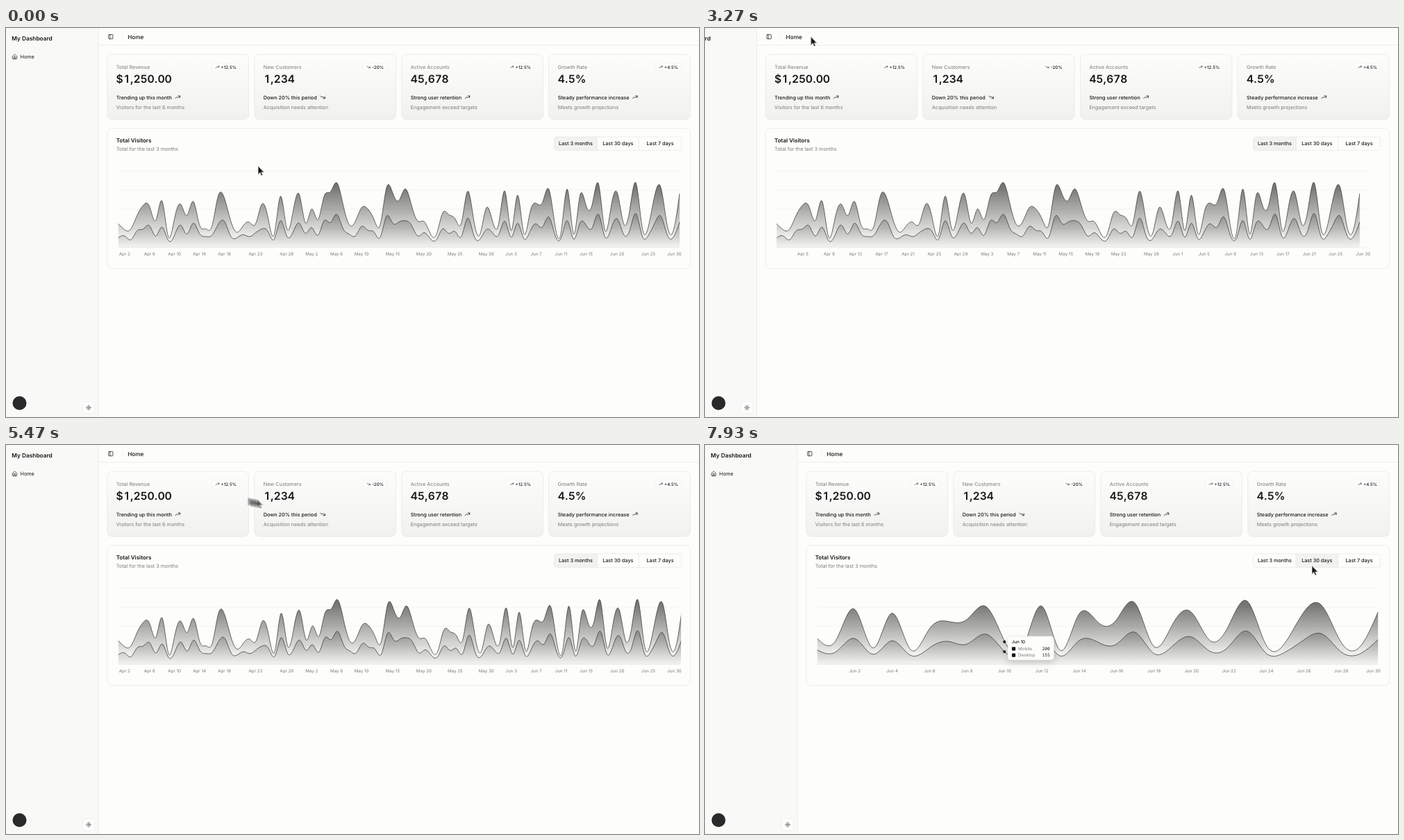
An HTML page with a canvas that plays this animation: 998 px wide and 561 px high, repeating every 8 s.

```html
<!DOCTYPE html>
<html lang="en">
<head>
<meta charset="utf-8">
<title>My Dashboard</title>
<style>
  html, body { margin: 0; width: 100%; height: 100%; overflow: hidden; background: #fdfdfb; }
  canvas { display: block; width: 998px; height: 561px; }
</style>
</head>
<body>
<canvas id="stage"></canvas>
<script>
const W = 998, H = 561, LOOP = 8000;
const canvas = document.getElementById('stage');
const ratio = window.devicePixelRatio || 1;
canvas.width = W * ratio;
canvas.height = H * ratio;
const ctx = canvas.getContext('2d');

const INK = '#171717', MUTED = '#7a7a7a', LINE = '#e6e6e6', PAGE = '#fdfdfb', ACCENT = '#f2f2f0';
const SIDEBAR = 133.2, CLOSE = 3183, OPEN = 4640, SWITCH = 6880;
const BASE = 316.4, UNIT = 110.2 / 1200;

// Daily visitors, Apr 1 to Jun 30
const desktop = [
  222, 97, 167, 242, 373, 301, 245, 409, 59, 261, 327, 292, 342, 137, 120, 138, 446, 364, 243, 89,
  137, 224, 138, 387, 215, 75, 383, 122, 315, 454, 165, 293, 247, 385, 481, 498, 388, 149, 227, 293,
  335, 197, 197, 448, 473, 338, 499, 315, 235, 177, 82, 81, 252, 294, 201, 213, 420, 233, 78, 340,
  178, 178, 470, 103, 439, 88, 294, 323, 385, 438, 155, 92, 492, 81, 426, 307, 371, 475, 107, 341,
  408, 169, 317, 480, 132, 141, 434, 448, 149, 103, 446];
const mobile = [
  15, 18, 12, 26, 29, 34, 18, 32, 11, 19, 35, 21, 38, 22, 17, 19, 36, 41, 18, 15,
  20, 17, 23, 29, 25, 13, 42, 18, 24, 38, 22, 31, 19, 42, 39, 52, 30, 21, 18, 33,
  27, 24, 16, 49, 38, 40, 42, 35, 18, 23, 14, 12, 29, 22, 25, 17, 46, 19, 13, 28,
  23, 20, 41, 16, 38, 14, 25, 37, 32, 48, 20, 15, 42, 13, 38, 35, 31, 52, 17, 29,
  45, 21, 27, 53, 18, 19, 38, 49, 20, 16, 40].map(v => v * 10);
const total = desktop.map((v, i) => v + mobile[i]);

const clamp = v => Math.max(0, Math.min(1, v));
const ramp = (t, start, length) => clamp((t - start) / length);
const smooth = s => s * s * (3 - 2 * s);
const mix = (a, b, p) => a + (b - a) * p;

function text(str, x, y, size, { weight = 400, color = INK, align = 'left', family = 'Inter, sans-serif' } = {}) {
  ctx.font = `${weight} ${size}px ${family}`;
  ctx.fillStyle = color;
  ctx.textAlign = align;
  ctx.fillText(str, x, y + size * 0.36);
  return ctx.measureText(str).width;
}

// Tabular figures: every digit is centred in a cell of equal width
function figures(str, x, y, size) {
  for (const char of str) {
    ctx.font = `600 ${size}px Inter, sans-serif`;
    const cell = /[\d$]/.test(char) ? size * 0.64 : ctx.measureText(char).width;
    text(char, x + cell / 2, y, size, { weight: 600, align: 'center' });
    x += cell;
  }
}

function box(x, y, w, h, r, fill, stroke = LINE) {
  ctx.beginPath();
  ctx.roundRect(x, y, w, h, r);
  ctx.fillStyle = fill;
  ctx.fill();
  if (!stroke) return;
  ctx.strokeStyle = stroke;
  ctx.lineWidth = 0.7;
  ctx.stroke();
}

function line(x1, y1, x2, y2, color = LINE, width = 0.7) {
  ctx.beginPath();
  ctx.moveTo(x1, y1);
  ctx.lineTo(x2, y2);
  ctx.strokeStyle = color;
  ctx.lineWidth = width;
  ctx.stroke();
}

const icons = {
  up: 'M3 17l6-6l4 4l8-8M14 7h7v7',
  down: 'M3 7l6 6l4-4l8 8M21 10v7h-7',
  panel: 'M5 3h14a2 2 0 0 1 2 2v14a2 2 0 0 1-2 2h-14a2 2 0 0 1-2-2v-14a2 2 0 0 1 2-2zM9 3v18',
  home: 'M3 10l9-8l9 8v9a2 2 0 0 1-2 2h-14a2 2 0 0 1-2-2zM9 21v-9h6v9',
  sun: 'M16 12a4 4 0 1 1-8 0a4 4 0 1 1 8 0M12 2v2M12 20v2M2 12h2M20 12h2M5 5l1.4 1.4M17.6 17.6l1.4 1.4M5 19l1.4-1.4M17.6 6.4l1.4-1.4'
};
for (const name in icons) icons[name] = new Path2D(icons[name]);

// Icons are drawn on a 24-unit grid, centred on (x, y)
function icon(name, x, y, size) {
  ctx.save();
  ctx.translate(x - size / 2, y - size / 2);
  ctx.scale(size / 24, size / 24);
  ctx.strokeStyle = INK;
  ctx.lineWidth = 2.1;
  ctx.lineCap = ctx.lineJoin = 'round';
  ctx.stroke(icons[name]);
  ctx.restore();
}

const sidebarWidth = t => SIDEBAR * (1 - ramp(t, CLOSE, 200) + ramp(t, OPEN, 200));

function drawSidebar(w) {
  const dx = w - SIDEBAR;
  ctx.fillStyle = '#f9f9f8';
  ctx.fillRect(0, 0, w, H);
  if (w > 0) line(w, 0, w, H);
  text('My Dashboard', 8.3 + dx, 14.8, 8.3, { weight: 600 });
  icon('home', 12.5 + dx, 41.5, 8.3);
  text('Home', 20.5 + dx, 41.7, 7.28);
  box(110.5 + dx, 539, 17, 17, 4, '#fefefd', '#ececec');
  icon('sun', 119 + dx, 547.5, 8.3);
}

function drawHeader(w) {
  line(w, 24.7, W, 24.7);
  icon('panel', w + 17.6, 12.6, 8.3);
  line(w + 34.5, 8.5, w + 34.5, 16.5, '#efefef');
  text('Home', w + 42, 12.8, 8.2, { weight: 500 });
}

const cards = [
  ['Total Revenue', '$1,250.00', '+12.5%', 'up', 'Trending up this month', 'Visitors for the last 6 months'],
  ['New Customers', '1,234', '-20%', 'down', 'Down 20% this period', 'Acquisition needs attention'],
  ['Active Accounts', '45,678', '+12.5%', 'up', 'Strong user retention', 'Engagement exceed targets'],
  ['Growth Rate', '4.5%', '+4.5%', 'up', 'Steady performance increase', 'Meets growth projections']
];

function drawCards(left) {
  const width = (985.5 - left - 25) / 4;
  const fill = ctx.createLinearGradient(0, 38, 0, 132);
  fill.addColorStop(0, PAGE);
  fill.addColorStop(1, '#f1f1ef');
  cards.forEach(([label, value, change, trend, note, detail], i) => {
    const x = left + i * (width + 8.33), tx = x + 12.9;
    box(x, 38, width, 94, 7, fill);
    text(label, tx, 56, 7.28, { color: MUTED });
    figures(value, tx, 73.7, 15.6);
    const right = x + width - 13;
    ctx.font = '500 6.24px Inter, sans-serif';
    const tw = ctx.measureText(change).width;
    box(right - tw - 17.5, 50.5, tw + 17.5, 11.4, 4, 'rgba(255,255,255,.4)', '#f1f1f0');
    text(change, right - 4.6, 56.4, 6.24, { weight: 500, align: 'right' });
    icon(trend, right - tw - 9.8, 56.3, 6.24);
    const nw = text(note, tx, 100, 7.28, { weight: 500 });
    icon(trend, tx + nw + 8.3, 99.8, 8.8);
    text(detail, tx, 113.9, 7.28, { color: MUTED });
  });
}

function drawRangePicker(t, pointer) {
  const edges = [789.5, 851.3, 911.3, 972.8];
  const active = t < SWITCH ? 0 : 1;
  ['Last 3 months', 'Last 30 days', 'Last 7 days'].forEach((label, i) => {
    const x = edges[i], w = edges[i + 1] - x;
    const hover = pointer.x > x && pointer.x < x + w && pointer.y > 157 && pointer.y < 177;
    if (i === active || hover) box(x, 157, w, 19.4, i ? 0 : [4, 0, 0, 4], ACCENT, null);
    if (i) line(x, 157, x, 176.4);
    text(label, x + w / 2, 166.8, 7.28, { weight: 500, align: 'center' });
  });
  box(edges[0], 157, edges[3] - edges[0], 19.4, 4, 'transparent');
}

const dayLabel = i => i < 30 ? `Apr ${i + 1}` : i < 61 ? `May ${i - 29}` : `Jun ${i - 60}`;

// Room a date label needs, gap included
function labelRoom(label) {
  const [month, day] = label.split(' ');
  const digits = [...day].reduce((sum, d) => sum + (d === '1' ? 2.75 : 3.9), 0);
  return { Apr: 29, May: 30.25, Jun: 29.1 }[month] + digits;
}

function drawAxis(first, left, width) {
  const step = width / (90 - first);
  let lastX = Infinity, lastRoom = 0;
  for (let i = 90; i >= first; i--) {
    const label = dayLabel(i), room = labelRoom(label);
    const x = Math.min(left + (i - first) * step, left + width - 7.6);
    if (lastX - x < (room + lastRoom) / 2 || x - left < 7) continue;
    text(label, x, 325.6, 6.24, { color: MUTED, align: 'center' });
    lastX = x;
    lastRoom = room;
  }
}

// Bezier control values of a natural cubic spline
function splineControls(v) {
  const n = v.length - 1, a = [], b = [2], r = [v[0] + 2 * v[1]];
  for (let i = 1; i < n; i++) {
    const last = i === n - 1;
    const m = (last ? 2 : 1) / b[i - 1];
    b[i] = (last ? 7 : 4) - m;
    r[i] = (last ? 8 * v[i] + v[n] : 4 * v[i] + 2 * v[i + 1]) - m * r[i - 1];
  }
  a[n - 1] = r[n - 1] / b[n - 1];
  for (let i = n - 2; i >= 0; i--) a[i] = (r[i] - a[i + 1]) / b[i];
  const c = a.map((_, i) => i === n - 1 ? (v[n] + a[i]) / 2 : 2 * v[i + 1] - a[i + 1]);
  return [a, c];
}

function curve(xs, ys) {
  const path = new Path2D(), [xa, xb] = splineControls(xs), [ya, yb] = splineControls(ys);
  path.moveTo(xs[0], ys[0]);
  for (let i = 0; i < xs.length - 1; i++) path.bezierCurveTo(xa[i], ya[i], xb[i], yb[i], xs[i + 1], ys[i + 1]);
  return path;
}

function areaUnder(path, xs) {
  const area = new Path2D(path);
  area.lineTo(xs[xs.length - 1], BASE);
  area.lineTo(xs[0], BASE);
  area.closePath();
  return area;
}

function fade(top, bottom, strength) {
  const g = ctx.createLinearGradient(0, top, 0, bottom);
  g.addColorStop(0.05, `rgba(23,23,23,${0.6 * strength})`);
  g.addColorStop(0.95, 'rgba(23,23,23,.06)');
  return g;
}

// How far the curve trails behind the resized axis; settles within 1500 ms
const trail = s => s < 0 ? 0 : 16 * (1 - Math.exp(-s / 40)) * (1 - ramp(s, 0, 1500)) ** 2;

function drawChart(t, w) {
  const left = w + 28.6;
  const width = 941.5 - Math.max(w, sidebarWidth(t - 22));
  const curveWidth = width + (t < OPEN ? -trail(t - CLOSE) : trail(t - OPEN));
  for (let i = 0; i < 5; i++) line(left, BASE - i * 27.55, left + width, BASE - i * 27.55, '#f0f0ee');

  const first = t < SWITCH ? 0 : 60, count = 91 - first;
  const p = 1 - (1 - ramp(t, SWITCH, 1500)) ** 2.5;
  const xs = [], upper = [], lower = [];
  for (let i = 0; i < count; i++) {
    const old = first ? Math.floor(i * 91 / count) : i;
    const y = series => BASE - UNIT * (first ? mix(series[old], series[first + i], p) : series[i]);
    const x = first ? mix(old / 90, i / (count - 1), p) : i / 90;
    xs.push(left + x * curveWidth);
    upper.push(y(total));
    lower.push(y(mobile));
  }

  ctx.save();
  ctx.beginPath();
  ctx.rect(left - 1, 190, width + 3, 130);
  ctx.clip();
  const top = curve(xs, upper), middle = curve(xs, lower);
  const mobileArea = areaUnder(middle, xs), between = areaUnder(top, xs);
  between.addPath(mobileArea);
  ctx.fillStyle = fade(Math.min(...lower), BASE, 0.8);
  ctx.fill(mobileArea);
  ctx.fillStyle = fade(Math.min(...upper), Math.max(...lower), 1);
  ctx.fill(between, 'evenodd');
  ctx.strokeStyle = '#2b2b2b';
  ctx.lineWidth = 0.7;
  ctx.stroke(middle);
  ctx.stroke(top);
  ctx.restore();

  drawAxis(first, left, width);
  if (first) drawTooltip(left + width / 3, 70);
}

function drawTooltip(x, day) {
  for (const v of [total[day], mobile[day]]) {
    ctx.beginPath();
    ctx.arc(x, BASE - v * UNIT, 2.1, 0, 7);
    ctx.fillStyle = INK;
    ctx.fill();
  }
  ctx.save();
  ctx.shadowColor = 'rgba(0,0,0,.16)';
  ctx.shadowBlur = 9 * ratio;
  ctx.shadowOffsetY = 4 * ratio;
  box(x + 5, 276, 66, 34, 4, PAGE, null);
  ctx.restore();
  box(x + 5, 276, 66, 34, 4, PAGE, '#ececec');
  text(dayLabel(day), x + 10.5, 283.7, 6.24, { weight: 500 });
  [['Mobile', mobile], ['Desktop', desktop]].forEach(([name, series], i) => {
    const y = 293.8 + i * 9.4;
    box(x + 10.7, y - 2.6, 5.2, 5.2, 1, INK, null);
    text(name, x + 19.8, y, 6.24, { color: MUTED });
    text(series[day], x + 65.6, y, 6.24, { weight: 500, align: 'right', family: '"Noto Sans Mono", monospace' });
  });
}

// Pointer moves: start, length, from, bend, to
const moves = [
  [1260, 600, [363, 199], [67, 209], [152.5, 12.5]],
  [3790, 500, [152.5, 12.5], [86, 18], [21, 14.5]],
  [4870, 1410, [21, 14.5], [450, 94], [874, 174]]
];

function pointerAt(t) {
  const [start, length, a, b, c] = moves.findLast(m => t >= m[0]) || moves[0];
  const p = smooth(ramp(t, start, length)), q = 1 - p;
  const at = k => q * q * a[k] + 2 * p * q * b[k] + p * p * c[k];
  return { x: at(0), y: at(1) };
}

const arrow = new Path2D('M0 0V12.2L2.8 9.6L4.6 13.8L6.6 12.9L4.9 8.9H8.6Z');

function drawPointer(t) {
  const samples = 12, shutter = 16;
  for (let i = 0; i < samples; i++) {
    const { x, y } = pointerAt(t + (i / (samples - 1) - 0.5) * shutter);
    ctx.save();
    ctx.globalAlpha = 0.25;
    ctx.translate(x, y);
    ctx.lineJoin = 'round';
    ctx.lineWidth = 1.5;
    ctx.strokeStyle = '#fff';
    ctx.stroke(arrow);
    ctx.fillStyle = '#0a0a0a';
    ctx.fill(arrow);
    ctx.restore();
  }
}

function draw(t) {
  const w = sidebarWidth(t), left = w + 12.6;
  ctx.setTransform(ratio, 0, 0, ratio, 0, 0);
  ctx.textRendering = 'geometricPrecision';
  ctx.fillStyle = PAGE;
  ctx.fillRect(0, 0, W, H);
  drawSidebar(w);
  drawHeader(w);
  drawCards(left);
  box(left, 144.6, 985.5 - left, 202.4, 7, PAGE);
  text('Total Visitors', left + 12.9, 161.8, 8, { weight: 600 });
  text('Total for the last 3 months', left + 12.9, 174.2, 7.28, { color: MUTED });
  drawRangePicker(t, pointerAt(t));
  drawChart(t, w);
  ctx.beginPath();
  ctx.arc(19.5, 541, 10, 0, 7);
  ctx.fillStyle = '#2a2a2a';
  ctx.fill();
  drawPointer(t);
}

function tick() {
  draw(performance.now() % LOOP);
  requestAnimationFrame(tick);
}
tick();
</script>
</body>
</html>
```
